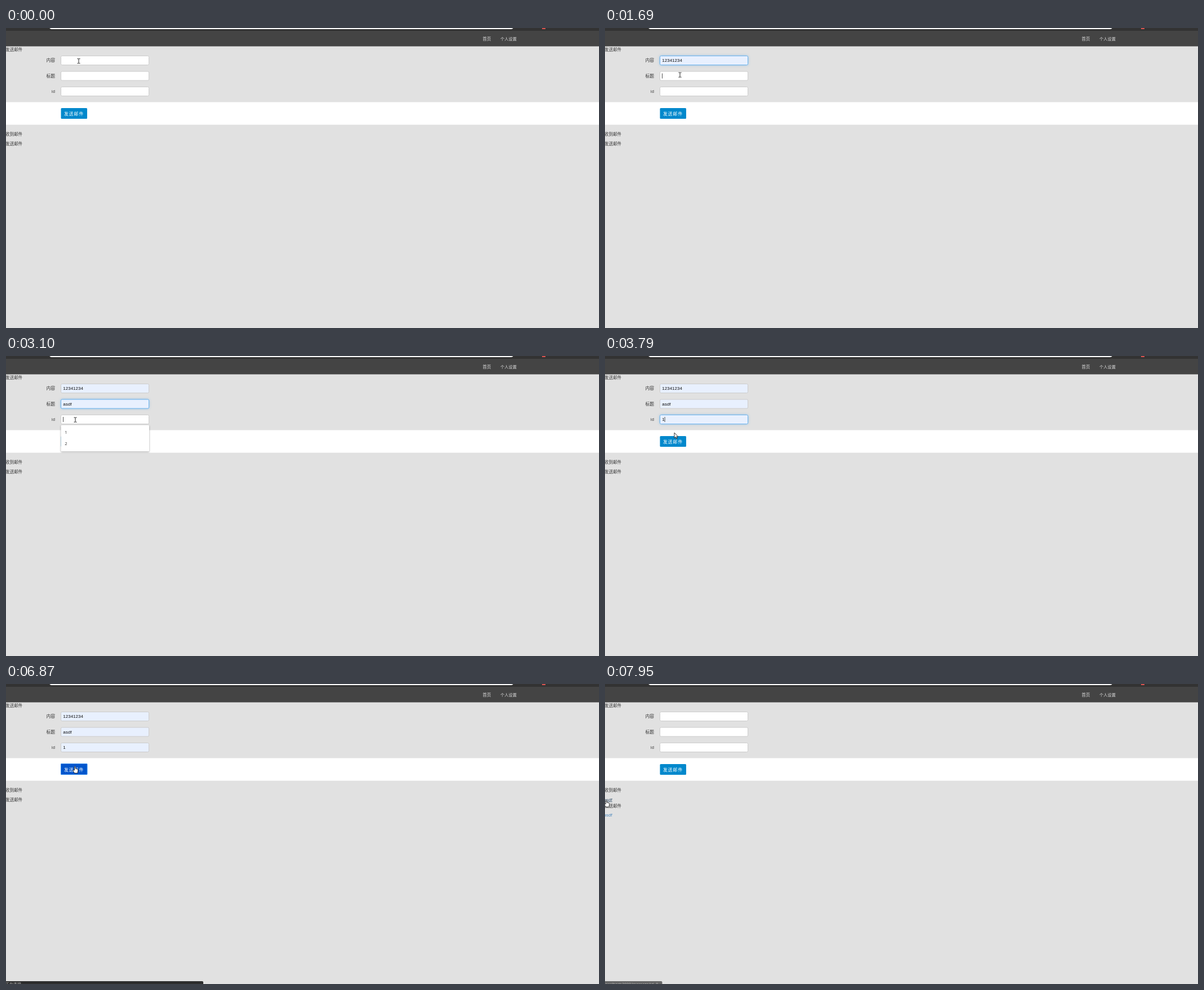
Write an HTML page with a canvas that moves like this. It is 1052 px wide and 532 px high and loops after 8000 ms.

```html
<!DOCTYPE html>
<html lang="zh-CN">
<head>
<meta charset="utf-8">
<title>发送邮件</title>
<style>
  html, body { margin: 0; width: 100%; height: 100%; overflow: hidden; background: #e1e1e1; }
  canvas { display: block; }
</style>
</head>
<body>
<canvas id="stage"></canvas>
<script>
const W = 1052, H = 532, LOOP = 8000;
const UI = '"Open Sans", "Noto Sans CJK SC", "Noto Sans CJK", sans-serif';
const HAN = '"Noto Sans CJK SC", "Noto Sans CJK", sans-serif';
const INPUT = '"Liberation Sans", Arial, sans-serif';

const canvas = document.getElementById('stage');
const ratio = window.devicePixelRatio || 1;
canvas.width = W * ratio;
canvas.height = H * ratio;
canvas.style.width = W + 'px';
canvas.style.height = H + 'px';
const ctx = canvas.getContext('2d');

const fields = [
  { label: '内容', y: 49, options: ['123', '12341234', '1234', 'asdf', '234', 'asdsf'] },
  { label: '标题', y: 76.5, options: ['123', 'asdf', '234', '345', 'asdsf', 'zdfadss'] },
  { label: 'id', y: 104, options: ['1', '2'] }
];

// Each step overrides part of the state from its time on.
const start = {
  values: ['', '', ''], ring: -1, caret: null, menu: -1, hover: -1,
  cursor: ['beam', 129, 58.5], button: 'normal', page: 'form', status: null
};
const steps = [
  [460, { caret: [0, 0], ring: 0 }],
  [580, { menu: 0 }],
  [880, { cursor: ['arrow', 130, 69], caret: null }],
  [1030, { cursor: ['arrow', 130, 82], hover: 0, values: ['123', '', ''], caret: [0, 0] }],
  [1150, { cursor: ['arrow', 130, 96], hover: 1, values: ['12341234', '', ''] }],
  [1300, { cursor: ['arrow', 130, 98] }],
  [1450, { menu: -1, hover: -1, caret: [0, 1] }],
  [1570, { cursor: ['beam', 133, 85] }],
  [1690, { cursor: ['beam', 133, 83], caret: [1, 0] }],
  [1810, { ring: 1, menu: 1 }],
  [2110, { cursor: ['arrow', 125, 100], hover: 0, values: ['12341234', '123', ''] }],
  [2230, { cursor: ['arrow', 119, 106] }],
  [2380, { cursor: ['arrow', 115, 121], hover: 1, values: ['12341234', 'asdf', ''] }],
  [2500, { cursor: ['arrow', 114, 125.5] }],
  [2620, { menu: -1, hover: -1, caret: [1, 1] }],
  [2740, { cursor: ['beam', 118, 113] }],
  [2860, { cursor: ['beam', 123, 113] }],
  [2980, { caret: [2, 0] }],
  [3100, { menu: 2 }],
  [3250, { ring: 2 }],
  [3400, { cursor: ['arrow', 123, 128], hover: 0, values: ['12341234', 'asdf', '1'] }],
  [3520, { cursor: ['arrow', 123, 132] }],
  [3790, { cursor: ['arrow', 123, 136], menu: -1, hover: -1, caret: [2, 1] }],
  [4330, { cursor: ['hand', 123, 146], button: 'hover' }],
  [4450, { caret: null, button: 'active' }],
  [4570, { ring: -1 }],
  [4940, { status: [350, '正在连接...', '#2d2d2d'] }],
  [5250, { status: [350, '正在等待 localhost 的响应...', '#2d2d2d'] }],
  [6870, { status: [350, '正在连接...', '#2d2d2d'] }],
  [6990, { page: 'blank', values: ['', '', ''], button: 'normal' }],
  [7260, { page: 'sent' }],
  [7530, { cursor: ['arrow', 62, 200], status: null }],
  [7680, { cursor: ['arrow', 24, 204] }],
  [7800, { cursor: ['hand', 3, 206] }],
  [7950, { status: [101.5, 'localhost:3000/message/id=8', '#666'] }]
];

function stateAt(time) {
  return Object.assign({}, start, ...steps.filter(s => s[0] <= time).map(s => s[1]));
}

function rect(x, y, w, h, fill) {
  ctx.fillStyle = fill;
  ctx.fillRect(x, y, w, h);
}

function box(x, y, w, h, radius, fill, stroke) {
  ctx.beginPath();
  ctx.roundRect(x, y, w, h, radius);
  ctx.fillStyle = fill;
  ctx.fill();
  if (stroke) {
    ctx.shadowColor = 'transparent';
    ctx.lineWidth = 1;
    ctx.strokeStyle = stroke;
    ctx.stroke();
  }
}

function glow(color, blur, dy = 0) {
  ctx.shadowColor = color;
  ctx.shadowBlur = blur * ratio;
  ctx.shadowOffsetY = dy * ratio;
}

// y is the vertical centre of the line.
function text(str, x, y, { size = 7.5, font = HAN, fill = '#333', align = 'left', gap = 0 } = {}) {
  ctx.font = `${size}px ${font}`;
  ctx.fillStyle = fill;
  ctx.textAlign = align;
  ctx.letterSpacing = gap + 'px';
  ctx.fillText(str, x, y + size * 0.36);
}

function drawHeader() {
  rect(0, 0, W, 5, '#333');
  box(77, -6, 823, 8, 5, '#fff');
  rect(951, 0, 6, 2, '#d9534f');
  rect(0, 5, W, 27.5, '#444');
  text('首页', 845.5, 19, { fill: '#ddd' });
  text('个人设置', 877, 19, { size: 7.25, fill: '#ddd' });
}

function drawField(field, i, s) {
  const mid = field.y + 8.5, focused = s.ring === i, value = s.values[i];
  text(field.label, 87, mid, { size: i < 2 ? 7.8 : 7.5, font: i < 2 ? HAN : UI, align: 'right' });
  ctx.save();
  if (focused) glow('rgba(82,168,236,.7)', 4);
  box(97.5, field.y + .5, 156, 16, 2, value ? '#e8f0fe' : '#fff', focused ? '#6db3ec' : '#ccc');
  ctx.restore();
  text(value, 101.3, mid, { size: 8, font: INPUT, fill: '#111' });
  if (s.caret && s.caret[0] === i) {
    const offset = s.caret[1] ? ctx.measureText(value).width : 0;
    rect(101.2 + offset, mid - 4.5, .8, 9, '#222');
  }
}

function drawButton(mode) {
  const active = mode === 'active';
  if (mode === 'normal') box(97.5, 142, 46.5, 19, 1.5, '#08c');
  else box(97.5, 141.5, 46.5, 19, .5, '#05c', active ? '#2a86e8' : '#05c');
  text('发送邮件', 103, 151.8, { size: 7.8, fill: '#fff', gap: 1 });
}

function drawMenu(i, hover) {
  const { y, options } = fields[i], top = y + 18.5;
  ctx.save();
  glow('rgba(0,0,0,.4)', 3, 1);
  box(97.5, top, 156.5, options.length * 19.9 + 7, 1.5, '#fff');
  ctx.restore();
  options.forEach((name, row) => {
    const rowTop = top + 3 + row * 19.9;
    if (row === hover) rect(98, rowTop, 155.5, 19.9, '#e8e8ec');
    text(name, 104.3, rowTop + 9.8, { font: UI });
  });
}

function drawLists(sent) {
  text('收到邮件', -1, 188.5);
  if (!sent) return text('发送邮件', -1, 205);
  const hovered = sent === 'hover';
  text('asdf', -2, 205, { font: UI, fill: hovered ? '#23405c' : '#337ab7' });
  if (hovered) rect(0, 208.6, 13, .6, '#23405c');
  text('发送邮件', -1, 216);
  text('asdf', -2, 232.5, { font: UI, fill: '#337ab7' });
}

function drawStatus([width, label, fill]) {
  box(-3, 527, width + 3, 9, 2, fill);
  text(label, -1, 532.5, { size: 7, font: UI, fill: '#bbb' });
}

const shapes = {
  arrow: 'M0 0V9.6L2.2 7.6L3.7 11L5.2 10.3L3.7 7H6.7Z',
  hand: 'M-1.6 7V.8Q-.7-.8.2.8V4L4 5Q5 5.3 4.8 7L4 12H-1.5L-4 8Q-4.4 6.4-3 6.5Z',
  beam: 'M-2.5-4H-.6L0-3.4L.6-4H2.5M0-3.4V3.6M-2.5 4.2H-.6L0 3.6L.6 4.2H2.5'
};

function drawCursor([kind, x, y]) {
  const path = new Path2D(shapes[kind]);
  ctx.save();
  ctx.translate(x, y);
  ctx.lineWidth = kind === 'beam' ? 1 : .9;
  ctx.strokeStyle = '#222';
  if (kind !== 'beam') {
    ctx.fillStyle = '#fff';
    ctx.fill(path);
  }
  ctx.stroke(path);
  ctx.restore();
}

function draw(time) {
  const s = stateAt(time);
  ctx.setTransform(ratio, 0, 0, ratio, 0, 0);
  rect(0, 0, W, H, '#e1e1e1');
  drawHeader();
  text('发送邮件', -1, 38.3);
  if (s.page !== 'blank') {
    rect(0, 131.5, W, 40, '#fff');
    fields.forEach((field, i) => drawField(field, i, s));
    drawButton(s.button);
    drawLists(s.page === 'sent' && (time >= 7800 ? 'hover' : 'plain'));
  }
  if (s.menu >= 0) drawMenu(s.menu, s.hover);
  if (s.status) drawStatus(s.status);
  drawCursor(s.cursor);
}

const begin = performance.now();
function tick() {
  draw((performance.now() - begin) % LOOP);
  requestAnimationFrame(tick);
}
tick();
</script>
</body>
</html>
```
